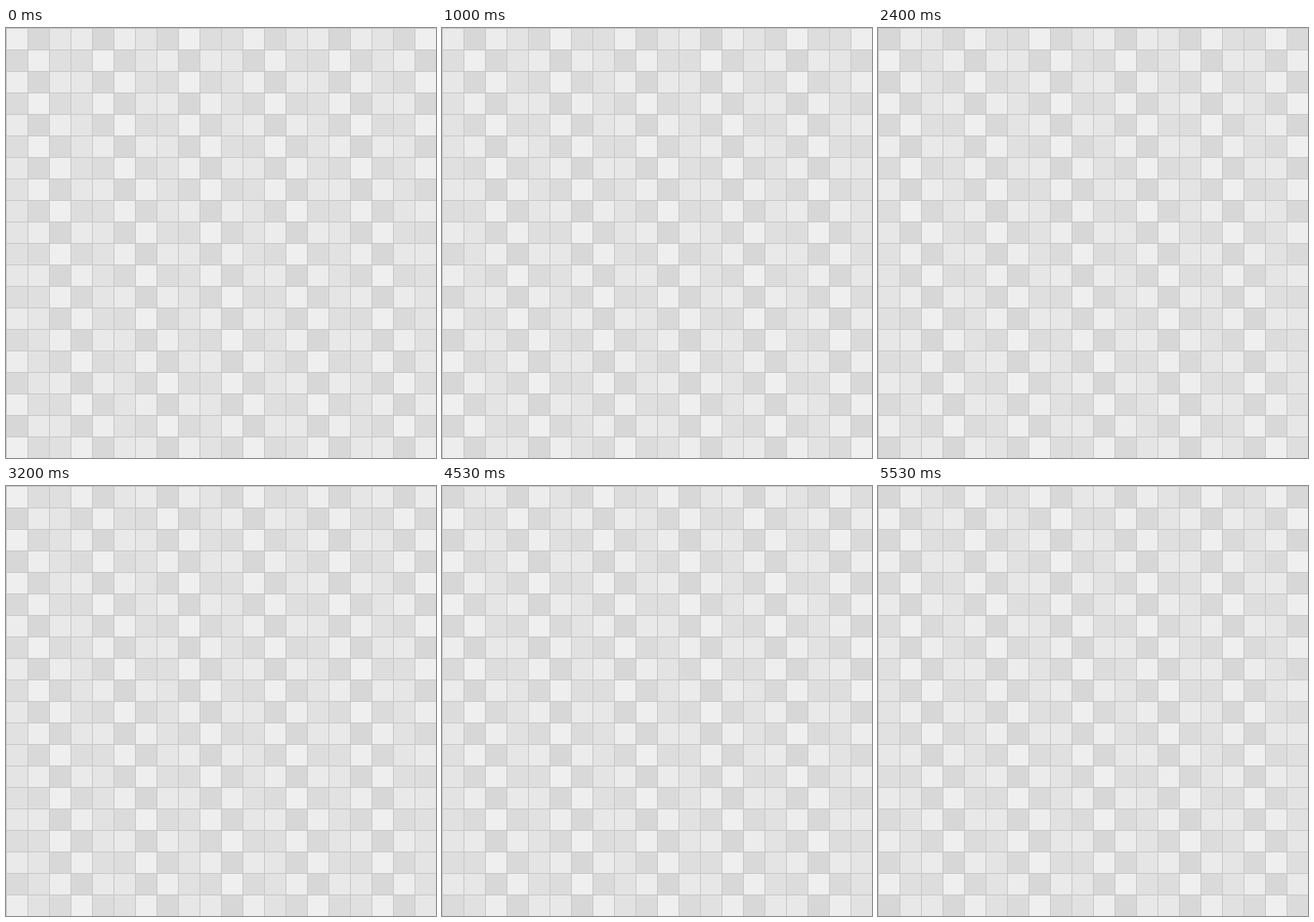
An HTML page for the animation above (5.59 s loop, 480 px wide and 480 px high).

```html
<!DOCTYPE html>
<html lang="en">
<head>
<meta charset="utf-8">
<title>Shimmering tiles</title>
<style>
  html, body { margin: 0; width: 100%; height: 100%; overflow: hidden; background: #c8c8c8; }
  svg { display: block; width: 100vw; height: 100vh; }
</style>
</head>
<body>
<svg id="stage" viewBox="0 0 480 480" shape-rendering="crispEdges">
  <rect width="480" height="480" fill="#c8c8c8"/>
</svg>
<script>
  const LOOP = 5590;
  const COUNT = 20, SIZE = 24;
  const STEPS_PER_MS = 15 / 1000;
  const PHASE_STEP = 0.797, PHASE_START = -0.37;
  const MID = 227, SWING = 12;

  const stage = document.getElementById('stage');
  const tiles = [];

  function addTile(col, row) {
    const rect = document.createElementNS('http://www.w3.org/2000/svg', 'rect');
    const box = { x: col * SIZE + 1, y: row * SIZE + 1, width: SIZE - 1, height: SIZE - 1 };
    for (const key in box) rect.setAttribute(key, box[key]);
    stage.append(rect);
    tiles.push({ rect, offset: 4 * col + 3 * row });
  }

  for (let row = 0; row < COUNT; row++)
    for (let col = 0; col < COUNT; col++) addTile(col, row);

  // A plane wave sampled so coarsely that neighbouring tiles alternate.
  function render(time) {
    const step = Math.floor((time % LOOP + 4) * STEPS_PER_MS);
    const phase = PHASE_START + step * PHASE_STEP;
    for (const { rect, offset } of tiles) {
      const gray = Math.round(MID + SWING * Math.cos(offset + phase));
      rect.setAttribute('fill', `rgb(${gray},${gray},${gray})`);
    }
  }

  let start = null;
  function tick(now) {
    if (start === null) start = now;
    render(now - start);
    requestAnimationFrame(tick);
  }

  render(0);
  requestAnimationFrame(tick);
</script>
</body>
</html>
```
